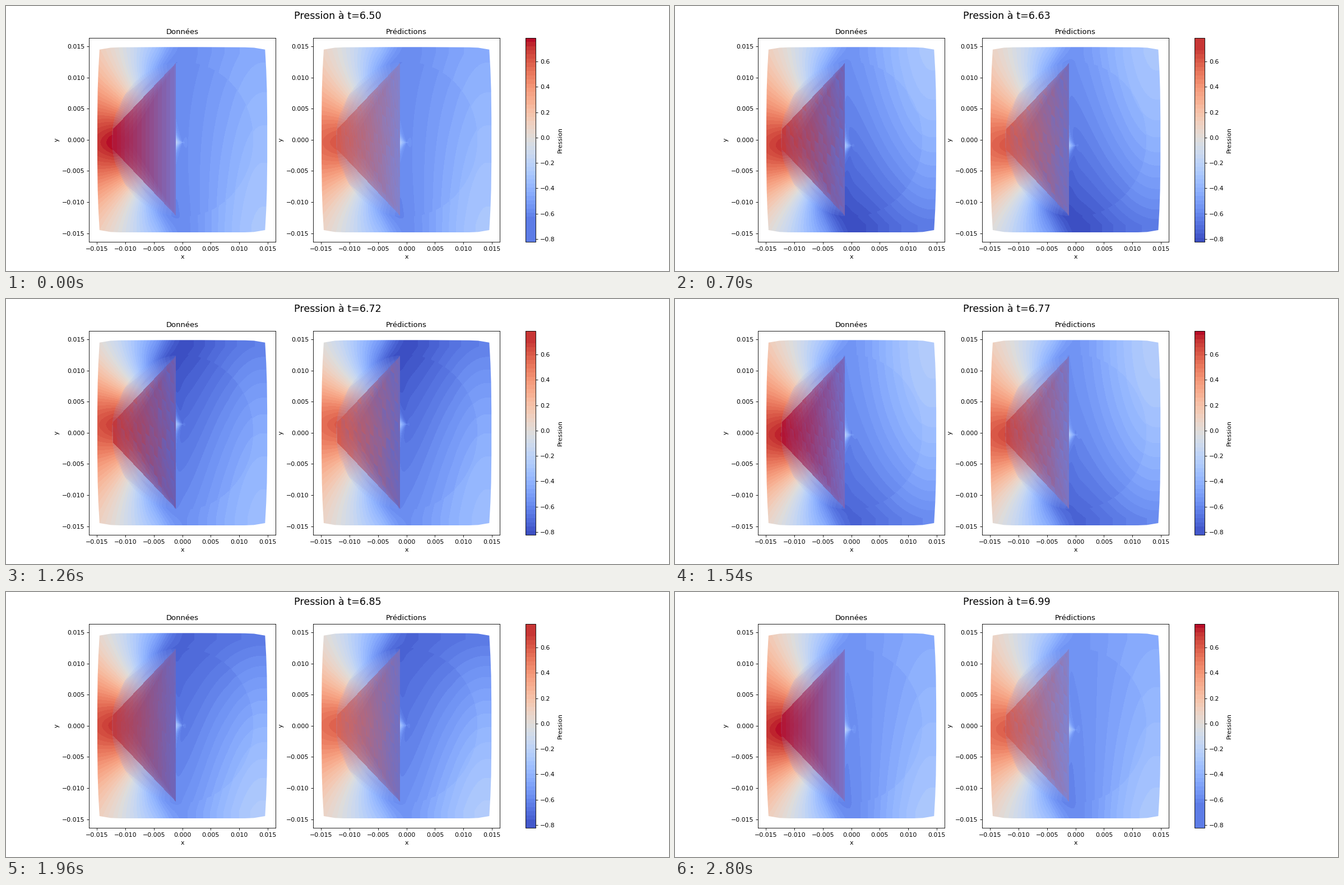
Write a matplotlib script that moves like this. It is 1183x473 px and loops after 2940 ms.

```python
import numpy as np
import matplotlib.pyplot as plt
from matplotlib.animation import FuncAnimation
from matplotlib.cm import ScalarMappable
from matplotlib.colors import ListedColormap, Normalize
from matplotlib.patches import Polygon

W, H, FRAMES, STEP = 1183, 473, 21, 140
DPI = 78.87
VMIN, VMAX, BANDS = -0.823, 0.788, 49
R = 12.4            # cylinder radius, mm
EDGE = -1.2         # right side of the folded mesh, mm
XM, YM = 14.93, 14.9

plt.rcParams["font.family"] = "DejaVu Sans"
coolwarm = plt.get_cmap("coolwarm")
table = coolwarm((np.arange(BANDS) + 0.5) / BANDS)[:, :3]

# Flow state at a few steps: top, centre and bottom of the cylinder, the three
# values downstream, stagnation (data, model), its height, jaggedness (data, model)
key_steps = [0, 5, 9, 11, 14, 17, 20]
keys = np.array([
    [-.60, -.59, -.61, -.43, -.35, -.29, .79, .62, -.5, 0, .5],
    [-.58, -.67, -.82, -.29, -.40, -.62, .72, .62, -1., 1, 1],
    [-.82, -.70, -.60, -.60, -.43, -.35, .69, .60, 1.3, 1, 1],
    [-.57, -.62, -.74, -.25, -.34, -.56, .76, .66, -.4, .6, .8],
    [-.74, -.67, -.58, -.62, -.40, -.26, .71, .59, 0, .25, .6],
    [-.60, -.63, -.60, -.29, -.35, -.49, .74, .60, .5, 0, .5],
    [-.56, -.59, -.62, -.43, -.36, -.28, .79, .60, -.7, 0, .8],
])
swing = np.array([-.08, 0, .08, -.16, 0, .16, 0, 0, .3, 0, 0])


def shedding(n):
    return np.cos(0.974 * (np.asarray(n) - 14.3))


residual = keys - np.outer(shedding(key_steps), swing)


def state(n):
    slow = [np.interp(n, key_steps, col) for col in residual.T]
    return np.array(slow) + swing * shedding(n)


def smooth(v):
    v = np.clip(v, 0, 1)
    return v * v * (3 - 2 * v)


def paint(p):
    i = np.floor((p - VMIN) / (VMAX - VMIN) * BANDS).astype(int)
    return table[np.clip(i, 0, BANDS - 1)]


def mix(a, b, m):
    return a + (b - a) * np.asarray(m)[..., None]


nx, ny = 304, 332
x, y = np.meshgrid(((np.arange(nx) + .5) / nx * 2 - 1) * XM,
                   ((np.arange(ny) + .5) / ny * 2 - 1) * YM)
r = np.hypot(x, y)
ay = np.abs(y)
left = (x < EDGE) & (r < R)
chord = 1.6 + (x + 12.2) * (12.2 - 1.6) / (EDGE + 12.2)
core = left & (x > -12.2) & (ay < chord)
lens = left & ~core
# fan angle around the tip where the chord meets the right side
fan = np.degrees(np.arctan2(12.2 - ay, EDGE - x) - np.arctan2(10.6, 11.0))
rng = np.random.default_rng(4)
shade = rng.uniform(-1, 1, 97)


def across(top, mid, bottom):
    v = np.clip(y / 12.5, -1.1, 1.1)
    return mid + (top - bottom) / 2 * v + ((top + bottom) / 2 - mid) * v * v


def pressure(top, mid, bottom, tr, mr, br, stag, y0):
    dy = y - y0 * np.clip(1.5 - ay / 10, 0, 1)
    th = np.arctan2(np.abs(dy), -x)
    side = np.where(dy > 0, top, bottom)
    surf = stag - (stag - side) * np.sin(th) ** 1.6
    near = np.minimum(R / r, 1)
    front = surf * near ** 0.6 + 0.35 * (1 - near) * th / (np.pi / 4)
    back = across(top, mid, bottom)
    back = back + (across(tr, mr, br) - back) * smooth((x + 3) / 17)
    back = back - 0.03 * np.clip(x / 8, 0, 1) * (r < R)
    return front + (back - front) * smooth((x + 5) / 6)


def picture(n, panel):
    s = state(n)
    stag, jag = s[6 + panel], s[9 + panel]
    rgb = paint(pressure(*s[:6], stag, s[8]))

    # folded mesh: red front seen through the blue wake, in jagged strips
    w = 0.72
    col = np.floor(x / w)
    saw = (y / 3.1 + 0.37 * col + 0.25 * x) % 1 - 0.5
    u = np.floor((x + 1.5 * jag * saw) / w) * w + w / 2
    cell = (col * 7 + np.floor(y / 3.1 + 0.37 * col + 0.25 * x) * 13).astype(int) % 97
    depth = np.clip((u + 12.2) / (12.2 + EDGE), 0, 1)
    red, blue = paint(np.array(stag)), paint(np.array(s[1]))
    m = np.clip(0.05 + 0.75 * depth + 0.05 * jag * shade[cell], 0, 1)
    fold = mix(np.broadcast_to(red, rgb.shape), blue, m)

    # translucent slivers between chord and arc
    haze = np.array([.50, .63, .95])
    sliver = (np.floor(ay * 0.55 - x * 0.4) * 5 + np.floor((R - r) / 0.9 + x * 0.3) * 11)
    tone = shade[sliver.astype(int) % 97]
    rim = np.clip((R - r) / 2.2, 0, 1)
    veil = mix(rgb, fold, rim * (0.24 + 0.08 * tone))
    veil = mix(veil, haze, 0.12 + 0.22 * rim + 0.06 * tone)

    steps = np.floor(np.clip(1 - fan / 15, 0, 1) * 5) / 5
    inner = mix(fold, veil, 0.35 * steps * np.clip((x + 13) / 4, 0, 1))
    rgb = np.where(core[..., None], inner, rgb)
    rgb = np.where(lens[..., None], veil, rgb)
    return np.clip(rgb, 0, 1)


fig, axes = plt.subplots(1, 2, figsize=(W / DPI, H / DPI), dpi=DPI)
norm = Normalize(VMIN, VMAX)
bar = fig.colorbar(ScalarMappable(norm, ListedColormap(table)), ax=list(axes),
                   label="Pression")
mids = VMIN + (np.arange(BANDS) + 0.5) / BANDS * (VMAX - VMIN)
heading = fig.suptitle("", fontsize=16)

corner = [(14.93, 3.5), (14.87, 8), (14.75, 11.2), (14.55, 14.5),
          (12.6, 14.8), (11, 14.86), (3.4, 14.9)]
quarter = np.array(corner) / 1000
outline = np.vstack([quarter, quarter[::-1] * [-1, 1], -quarter, quarter[::-1] * [1, -1]])

images = []
ticks = np.arange(-3, 4) * 0.005
for ax, name in zip(axes, ("Données", "Prédictions")):
    im = ax.imshow(np.ones((ny, nx, 3)), origin="lower", aspect="auto",
                   interpolation="bilinear",
                   extent=np.array([-XM, XM, -YM, YM]) / 1000)
    ax.set(title=name, xlabel="x", ylabel="y", xticks=ticks, yticks=ticks,
           xlim=(-.01642, .01642), ylim=(-.01639, .01639))
    im.set_clip_path(Polygon(outline, transform=ax.transData))
    images.append(im)


def draw(n):
    s = state(n)
    for panel, im in enumerate(images):
        im.set_data(picture(n, panel))
    low, high = s[:3].min() - 0.03, s[6]
    bar.solids.set_array(np.clip(mids, low, high).reshape(-1, 1))
    heading.set_text(f"Pression à t={6.504 + 0.0245 * n:.2f}")
    return images


anim = FuncAnimation(fig, draw, frames=FRAMES, interval=STEP, repeat=True,
                     repeat_delay=0, init_func=lambda: draw(0), blit=False)
plt.show()
```
